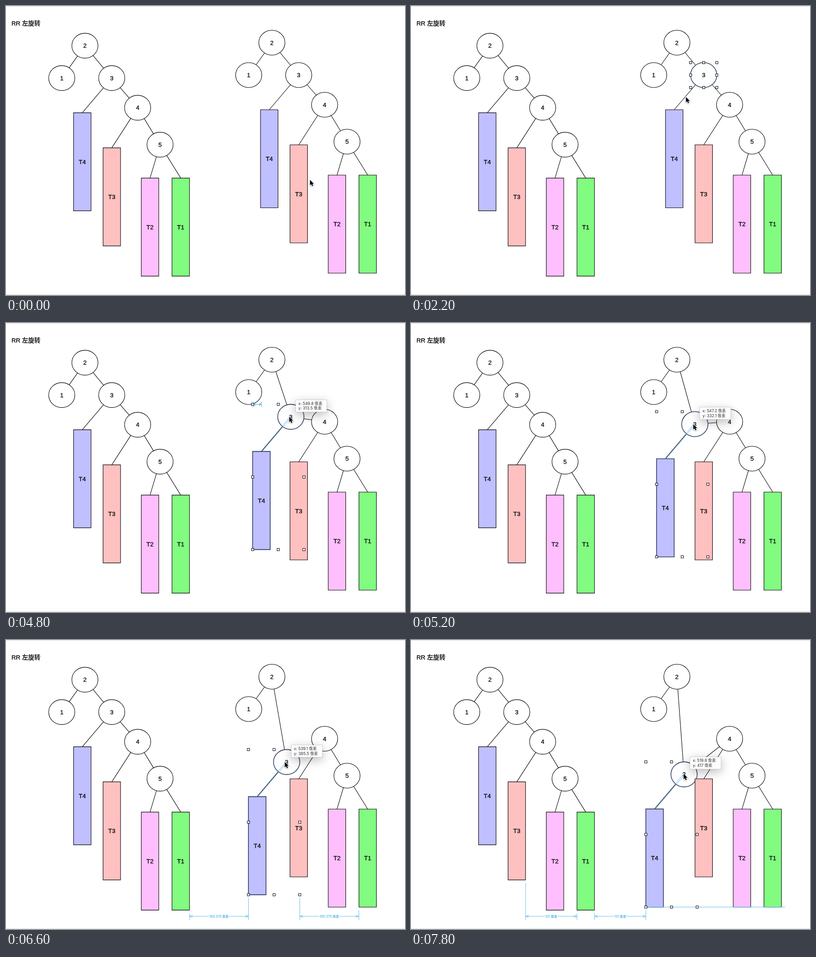
Animation, 878 px wide and 638 px high, one loop 8 s. Source, as an HTML page with a canvas:

```html
<!DOCTYPE html>
<html lang="zh">
<head>
<meta charset="utf-8">
<title>RR 左旋转</title>
<style>
  html, body { margin: 0; width: 100%; height: 100%; overflow: hidden; background: #fff; }
  canvas { display: block; width: 878px; height: 638px; }
</style>
</head>
<body>
<canvas id="stage"></canvas>
<script>
const W = 878, H = 638, LOOP = 8000, STEP = 200;
const SCALE = 1.157;                    // document pixels per screen pixel
const HOME = { x: 569.8, y: 250.3 };    // group position before the drag
const GRAB = 4000;
const CLICKS = [1200, 2600, 3200];      // node, then its edge, then its bar
const RX = 28.8, RY = 27.5, BAR_W = 38.5, BAR_H = 216.5;
const BLUE = '#62bdea';
const SANS = '13.5px "Liberation Sans", Arial, "Noto Sans CJK SC", "Noto Sans CJK", sans-serif';
const UI = 'Inter, "Noto Sans CJK SC", "Noto Sans CJK", sans-serif';

const canvas = document.getElementById('stage');
const ratio = window.devicePixelRatio || 1;
canvas.width = W * ratio;
canvas.height = H * ratio;
const ctx = canvas.getContext('2d');

// Each part hangs from its parent by an offset; bars have a fill
const parts = [
  { id: '2', x: 0, y: 0 },
  { id: '1', from: '2', x: -51, y: 71.5 },
  { id: '3', from: '2', x: 59, y: 71.5 },
  { id: '4', from: '3', x: 57, y: 65.5 },
  { id: '5', from: '4', x: 49.3, y: 81.5 },
  { id: 'T4', from: '3', x: -64.8, y: 76.5, fill: '#c0bfff' },
  { id: 'T3', from: '4', x: -56.9, y: 88.5, fill: '#ffc0c0' },
  { id: 'T2', from: '5', x: -22.1, y: 73.8, fill: '#ffbfff' },
  { id: 'T1', from: '5', x: 45.5, y: 73.8, fill: '#82fb81' }
];

// time, x, y of the free pointer
const roam = [
  [0, 669, 384], [1000, 640, 163], [1200, 640, 163], [1600, 718, 462], [1800, 610, 201],
  [2200, 605, 201], [2600, 605, 201], [3200, 580, 290], [3600, 642, 154.5]
];
// time, document x, document y, pointer offset from the node centre
const drag = [
  [GRAB, 565.2, 257.8, -2, 2], [4800, 549.8, 313.5, -3.5, 0], [5800, 543.2, 360, -3, .5],
  [6600, 539.1, 385.5, -4, 0], [7400, 521.5, 417, -1, -1], [7800, 519.8, 417, -1, -1]
];

function at(keys, t) {
  const i = keys.findIndex(k => k[0] > t);
  if (i < 0) return keys[keys.length - 1].slice(1);
  const a = keys[i - 1], b = keys[i], p = (t - a[0]) / (b[0] - a[0]);
  return a.map((v, j) => v + (b[j] - v) * p).slice(1);
}

function layout(ox, oy, dx = 0, dy = 0) {
  const spots = {};
  for (const { id, from, x, y } of parts) {
    const base = spots[from] || { x: ox, y: oy };
    spots[id] = { x: base.x + x, y: base.y + y };
  }
  for (const id of ['3', 'T4']) {
    spots[id].x += dx;
    spots[id].y += dy;
  }
  return spots;
}

function line(x1, y1, x2, y2, color = '#000', width = 1) {
  ctx.strokeStyle = color;
  ctx.lineWidth = width;
  ctx.beginPath();
  ctx.moveTo(x1, y1);
  ctx.lineTo(x2, y2);
  ctx.stroke();
}

function text(str, x, y, font, color, align = 'center') {
  ctx.font = font;
  ctx.fillStyle = color;
  ctx.textAlign = align;
  ctx.fillText(str, x, y);
}

// Slightly heavier lettering for the drawing itself
function label(str, x, y, align) {
  text(str, x, y, SANS, '#000', align);
  ctx.strokeStyle = '#000';
  ctx.lineWidth = .3;
  ctx.strokeText(str, x, y);
}

function paint(path, fill, selected) {
  if (selected) {
    ctx.strokeStyle = 'rgba(150, 195, 245, .4)';
    ctx.lineWidth = 4;
    ctx.stroke(path);
  }
  ctx.fillStyle = fill;
  ctx.fill(path);
  ctx.strokeStyle = selected ? '#050a20' : '#000';
  ctx.lineWidth = 1.1;
  ctx.stroke(path);
}

function outline({ x, y }, isBar) {
  const path = new Path2D();
  if (isBar) path.rect(x - BAR_W / 2, y, BAR_W, BAR_H);
  else path.ellipse(x, y, RX, RY, 0, 0, 7);
  return path;
}

function tree(spots, level = 0) {
  const a = spots['3'], b = spots.T4;
  const glow = () => line(a.x, a.y, b.x, b.y, 'rgba(150, 200, 250, .45)', 5);
  const chosen = id => (id === '3' && level > 0) || (id === 'T4' && level > 2);
  if (level > 1) glow();
  for (const { id, from } of parts) {
    if (from) line(spots[from].x, spots[from].y, spots[id].x, spots[id].y, '#000', 1.1);
  }
  for (const { id, fill } of parts) {
    const s = spots[id];
    paint(outline(s, fill), fill || '#fff', chosen(id));
    label(id, s.x, s.y + 4.8 + (fill ? BAR_H / 2 : 0));
    if (id === '3' && level > 1) {
      ctx.save();
      ctx.clip(outline(s));
      glow();
      ctx.restore();
    }
  }
}

// Bounds of whatever has been selected so far
function bounds(spots, level) {
  const a = spots['3'], b = spots.T4;
  const box = { l: a.x - RX, t: a.y - RY, r: a.x + RX, b: a.y + RY };
  if (level > 1) Object.assign(box, { l: b.x, b: b.y });
  if (level > 2) Object.assign(box, { l: b.x - BAR_W / 2, b: b.y + BAR_H });
  return box;
}

function handles({ l, t, r, b }) {
  const cx = (l + r) / 2, cy = (t + b) / 2;
  ctx.lineWidth = 1;
  ctx.strokeStyle = '#000';
  ctx.fillStyle = '#fff';
  for (const x of [l, cx, r]) for (const y of [t, cy, b]) {
    if (x === cx && y === cy) continue;
    ctx.fillRect(x - 2.6, y - 2.6, 5.2, 5.2);
    ctx.strokeRect(x - 2.6, y - 2.6, 5.2, 5.2);
  }
}

function head(x, y, len) {
  ctx.beginPath();
  ctx.moveTo(x + len, y - 2.5);
  ctx.lineTo(x, y);
  ctx.lineTo(x + len, y + 2.5);
  ctx.stroke();
}

// Spacing mark between two edges, each given as { x, bottom }
function gauge(p, q, str) {
  const y = 610, mid = (p.x + q.x) / 2, font = 'bold 7px ' + UI;
  ctx.font = font;
  const half = ctx.measureText(str).width / 2 + 1;
  for (const e of [p, q]) line(e.x, e.bottom + 7, e.x, 618, BLUE);
  line(p.x, y, mid - half, y, BLUE);
  line(mid + half, y, q.x, y, BLUE);
  head(p.x, y, 7);
  head(q.x, y, -7);
  text(str, mid, y + 2.6, font, BLUE);
}

// side is -1 for the left edge and 1 for the right edge
const edge = (s, side) => ({ x: s.x + side * BAR_W / 2, bottom: s.y + BAR_H });

function guides(t, left, right, { l, t: top, r, b }) {
  const start = { x: l, bottom: b }, end = { x: r, bottom: b };
  if (t === GRAB) {
    line(left['1'].x - RX - 8, top, r + 8, top, BLUE);
    line(l, right['2'].y - RY - 8, l, b + 8, BLUE);
  }
  if (t === 4800) {
    const stop = right['1'].x + RX - 1;
    for (const x of [l + 1, stop]) line(x, top - 6, x, top + 6, BLUE, 1.3);
    line(l, top, stop, top, BLUE, 1.3);
    head(l + 1, top, 5);
    head(stop, top, -5);
  }
  if (t === 6600) {
    gauge(edge(left.T1, 1), start, '150.375 像素');
    gauge(end, edge(right.T1, -1), '150.375 像素');
  }
  if (t >= 7400) line(l, b, edge(right.T1, 1).x + 8, b, BLUE);
  if (t === 7800) {
    gauge(edge(left.T3, 1), edge(left.T1, -1), '131 像素');
    gauge(edge(left.T1, 1), start, '131 像素');
  }
}

function tooltip(x, y, values) {
  ctx.save();
  ctx.shadowColor = 'rgba(0, 0, 0, .28)';
  ctx.shadowBlur = 22 * ratio;
  ctx.shadowOffsetY = 6 * ratio;
  ctx.fillStyle = '#fdfdfd';
  ctx.fillRect(x, y, 68.5, 27);
  ctx.restore();
  ctx.strokeStyle = 'rgba(0, 0, 0, .16)';
  ctx.lineWidth = 1;
  ctx.strokeRect(x, y, 68.5, 27);
  values.forEach((v, i) => {
    const str = `${'xy'[i]}: ${Math.round(v * 10) / 10} 像素`;
    text(str, x + 6, y + 11.3 + i * 10.5, '500 8.6px ' + UI, '#484848', 'left');
  });
}

const arrow = new Path2D('M0 0V11.8L2.7 9.3 4.6 13.6 6.8 12.7 4.9 8.4H8.6Z');

function cursor(x, y) {
  ctx.save();
  ctx.translate(x, y);
  ctx.shadowColor = 'rgba(0, 0, 0, .35)';
  ctx.shadowBlur = 3 * ratio;
  ctx.shadowOffsetY = ratio;
  ctx.strokeStyle = '#fff';
  ctx.lineWidth = 1.8;
  ctx.stroke(arrow);
  ctx.shadowColor = 'transparent';
  ctx.fillStyle = '#000';
  ctx.fill(arrow);
  ctx.restore();
}

function draw(t) {
  const dragging = t >= GRAB;
  const [x, y, gripX, gripY] = dragging ? at(drag, t) : [HOME.x, HOME.y];
  const level = CLICKS.filter(c => t >= c).length;
  const left = layout(173.7, 87.6);
  const right = layout(585.1, 81, (x - HOME.x) / SCALE, (y - HOME.y) / SCALE);
  const box = bounds(right, level);
  const [px, py] = dragging ? [right['3'].x + gripX, right['3'].y + gripY] : at(roam, t);

  ctx.setTransform(ratio, 0, 0, ratio, 0, 0);
  ctx.fillStyle = '#fff';
  ctx.fillRect(0, 0, W, H);
  for (const edgeY of [.5, H - .5]) line(0, edgeY, W, edgeY, '#d8d8d8');
  label('RR 左旋转', 12, 43, 'left');

  tree(left);
  tree(right, level);
  guides(t, left, right, box);
  if (level) handles(box);
  if (dragging) tooltip(px + 14, py - 37.5, [x, y]);
  cursor(px, py);
}

const begin = performance.now();
function tick() {
  const t = (performance.now() - begin) % LOOP;
  draw(Math.floor(t / STEP) * STEP);
  requestAnimationFrame(tick);
}
tick();
</script>
</body>
</html>
```
